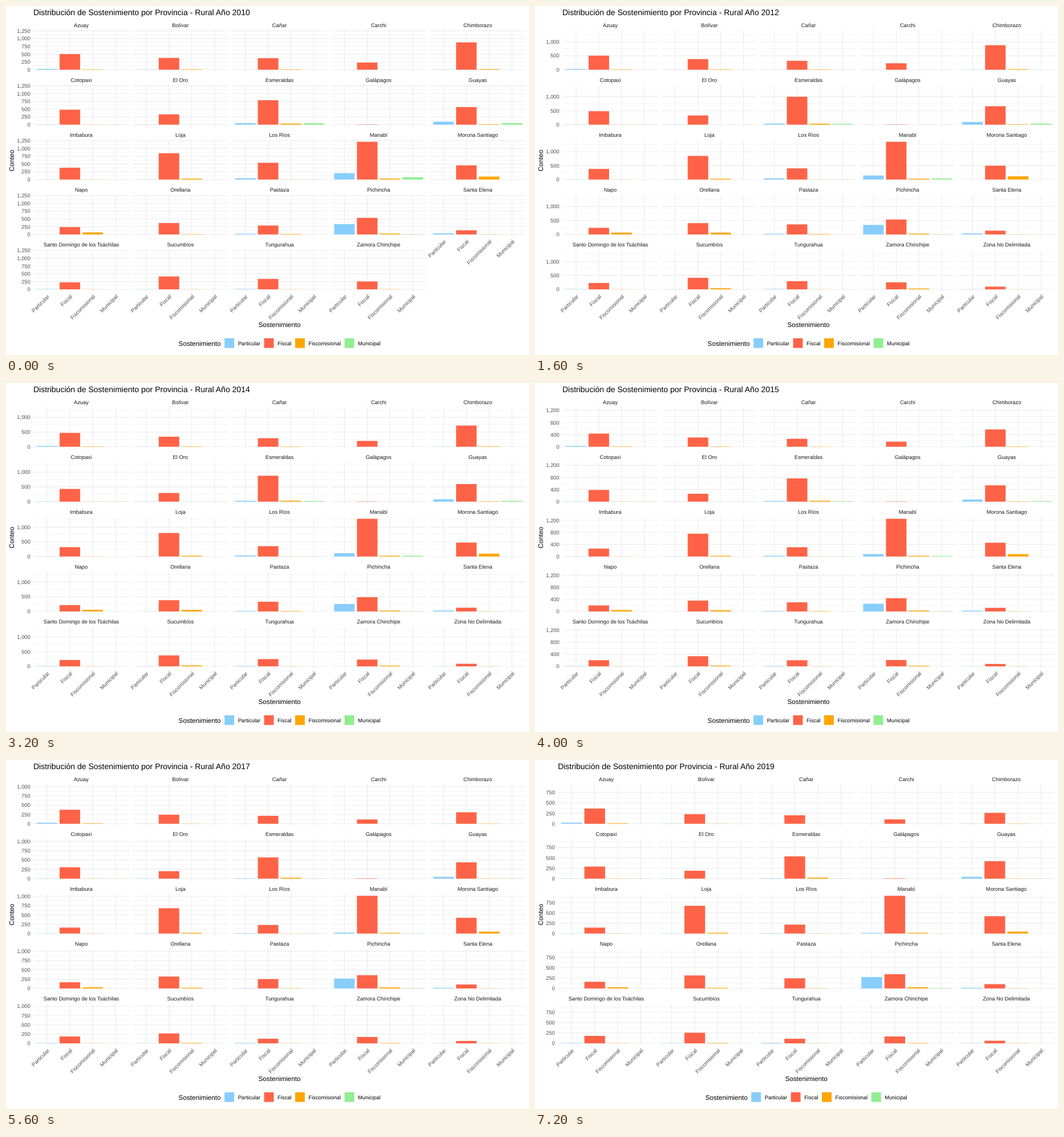
Animation, 917 px wide and 611 px high, one loop 8 s. Source, as an HTML page:

```html
<!DOCTYPE html>
<html lang="es">
<head>
<meta charset="utf-8">
<title>Sostenimiento por Provincia</title>
<style>
  html, body { margin: 0; width: 100%; height: 100%; overflow: hidden; background: #fff; }
  svg { display: block; width: 917px; height: 611px; }
  text { font: 9.34px "Liberation Sans", Arial, sans-serif; text-rendering: geometricPrecision; }
  .title { font-size: 14px; }
  .label { font-size: 11.68px; }
  .tick { fill: #4d4d4d; }
  .strip { fill: #1a1a1a; }
  .major { stroke: #ebebeb; stroke-width: 1.13; }
  .minor { stroke: #ebebeb; stroke-width: .57; }
  .year { visibility: hidden; animation: show 8s step-end infinite; }
  @keyframes show { 0% { visibility: visible; } 10%, 100% { visibility: hidden; } }
</style>
</head>
<body>
<svg id="chart" viewBox="0 0 917 611"></svg>
<script>
const FIRST = 2010, YEARS = 10, HOLD = 0.8;
const KINDS = ['Particular', 'Fiscal', 'Fiscomisional', 'Municipal'];
const COLORS = ['#87cefa', '#ff6347', '#ffa500', '#90ee90'];
const KEY_WIDTHS = [39.4, 24.4, 56.6, 39.4];
const RIGHT = 911.16, GAP = 5.84, ROW = 96.12, ZERO = 111.55, RISE = 66.1, PAD = 3.3;

const lerp = (a, b, t) => a + (b - a) * t;
const ramp = (year, from, to) => Math.min(1, Math.max(0, (year - from) / (to - from)));
const smooth = t => t * t * (3 - 2 * t);

// A level held from 2012 that eases to its end by 2018, with an optional other start in 2010.
const trend = (high, end = high, start = high) => year => year < 2012
  ? lerp(start, high, ramp(year, 2010, 2012))
  : lerp(high, end, smooth(ramp(year, 2012, 2018)));

// Straight segments through [year, value] points.
const through = (...points) => year => points.reduce((value, [to, next], i) =>
  i ? lerp(value, next, ramp(year, points[i - 1][0], to)) : next, 0);

const peak = through([2010, 1215], [2012, 1354], [2015, 1249], [2016, 1122], [2018, 909]);
const none = trend(0), trace = trend(4);

const provinces = [];
const add = (name, fiscal, particular = none, mixed = trace, municipal = none) =>
  provinces.push({ name, series: [particular, fiscal, mixed, municipal] });

add('Azuay', trend(505, 365), trend(26), trend(12));
add('Bolívar', trend(380, 230), trace, trend(14, 4));
add('Cañar', trend(320, 204, 372), none, trend(14, 0));
add('Carchi', trend(230, 105), none, none);
add('Chimborazo', trend(880, 262), trace, trend(20, 5));
add('Cotopaxi', trend(480, 290), trace, trace, trace);
add('El Oro', trend(330, 190), trace, none);
add('Esmeraldas', trend(1000, 536, 785), trend(36, 8, 50), trend(34, 24), trend(28, 4, 45));
add('Galápagos', trend(9), none, none);
add('Guayas', trend(660, 420, 565), trend(94, 43), trend(14, 4), trend(36, 5, 50));
add('Imbabura', trend(380, 142), trace);
add('Loja', trend(846, 667), trace, trend(28, 18));
add('Los Ríos', trend(400, 215, 539), trend(42, 8), trace, trace);
add('Manabí', peak, trend(145, 16, 205), trend(30, 17), trend(38, 3, 75));
add('Morona Santiago', trend(495, 417, 456), none, trend(115, 46, 95));
add('Napo', trend(235, 160), none, trend(65, 28));
add('Orellana', trend(405, 312, 366), none, trend(65, 14, 10));
add('Pastaza', trend(360, 243, 287), trend(22, 4), trend(15, 5));
add('Pichincha', trend(534, 342), through([2010, 330], [2012, 342], [2014, 250], [2019, 275]), trend(28), trend(8));
add('Santa Elena', trend(134, 103), trend(36, 16));
add('Santo Domingo de los Tsáchilas', trend(226, 180), trend(8));
add('Sucumbíos', trend(414, 255), trace, trend(38, 10, 4));
add('Tungurahua', trend(293, 110, 336), trend(12), trace);
add('Zamora Chinchipe', trend(252, 165), none, trend(30, 8, 6));
add('Zona No Delimitada', trend(96, 62), trace);

// Picks the tick step that best balances round numbers, coverage and density.
function tickStep(max) {
  const low = -max * 0.05, high = max * 1.05, span = high - low;
  let best = { score: -Infinity };
  [1, 5, 2, 2.5, 4, 3].forEach((q, i) => {
    const step = q * 100, inside = Math.floor(high / step);
    for (const count of [inside, inside + 1]) {
      const end = count * step;
      const cover = 1 - 0.5 * ((high - end) ** 2 + low ** 2) / (0.1 * span) ** 2;
      const ratio = (Math.max(end, high) - low) / (4 * step);
      const density = 2 - Math.max(ratio, 1 / ratio);
      const score = 0.25 * (1 - i / 5) + 0.2 * cover + 0.5 * density;
      if (score > best.score) best = { score, step };
    }
  });
  return best.step;
}

const px = n => n.toFixed(2);
const line = (x1, y1, x2, y2, cls) =>
  `<line class="${cls}" x1="${px(x1)}" y1="${px(y1)}" x2="${px(x2)}" y2="${px(y2)}"/>`;
const rect = (x, y, w, h, fill) =>
  `<rect x="${px(x)}" y="${px(y)}" width="${px(w)}" height="${px(h)}" fill="${fill}"/>`;
const text = (str, x, y, cls = '', anchor = 'start', angle = 0) =>
  `<text class="${cls}" text-anchor="${anchor}" transform="translate(${px(x)} ${px(y)}) rotate(${angle})">${str}</text>`;

function drawPanel({ name, series }, index, { year, max, step, left, width }, lastRow) {
  const col = index % 5;
  const x = left + col * (width + GAP), zero = ZERO + Math.floor(index / 5) * ROW;
  const top = zero - RISE - PAD, bottom = zero + PAD;
  const scale = RISE / max, half = step / 2, unit = width / 4.2;
  const center = k => x + unit * (k + 0.6);
  let out = text(name, x + width / 2, zero - 74.65, 'strip', 'middle');

  for (let k = 0; k * half <= max * 1.05; k++) {
    const y = zero - k * half * scale, major = k % 2 === 0;
    out += line(x, y, x + width, y, major ? 'major' : 'minor');
    if (major && col === 0)
      out += text((k * half).toLocaleString('en-US'), left - 5.26, y + 3.3, 'tick', 'end');
  }
  KINDS.forEach((kind, k) => {
    out += line(center(k), top, center(k), bottom, 'major');
    if (lastRow) out += text(kind, center(k) + 4.7, bottom + 9.96, 'tick', 'end', -45);
  });
  series.forEach((value, k) => {
    const h = value(year) * scale;
    if (h > 0) out += rect(center(k) - unit * 0.45, zero - h, unit * 0.9, h, COLORS[k]);
  });
  return out;
}

function drawLegend(mid) {
  let x = mid - 176.95;
  let out = text('Sostenimiento', x, 594.6, 'label');
  x += 79.84;
  KINDS.forEach((kind, k) => {
    out += rect(x + 0.7, 581.7, 16.94, 16.94, COLORS[k]) + text(kind, x + 24.18, 593.7);
    x += 24.18 + KEY_WIDTHS[k] + GAP;
  });
  return out;
}

function drawYear(i) {
  const year = FIRST + i, max = peak(year), step = tickStep(max);
  const topTick = Math.floor(max * 1.05 / step) * step;
  const left = topTick < 1000 ? 40.15 : 47.95;
  const width = (RIGHT - left - 4 * GAP) / 5, mid = (left + RIGHT) / 2;
  const shown = provinces.slice(0, year < 2012 ? 24 : 25);
  const axes = { year, max, step, left, width };
  return `<g class="year" style="animation-delay:${((i - YEARS) * HOLD).toFixed(1)}s">`
    + text(`Distribución de Sostenimiento por Provincia - Rural Año ${year}`, left, 16, 'title')
    + shown.map((p, n) => drawPanel(p, n, axes, n + 5 >= shown.length)).join('')
    + text('Sostenimiento', mid, 561.7, 'label', 'middle')
    + text('Conteo', 14.2, 270.7, 'label', 'middle', -90)
    + drawLegend(mid) + '</g>';
}

document.getElementById('chart').innerHTML =
  Array.from({ length: YEARS }, (_, i) => drawYear(i)).join('');
</script>
</body>
</html>
```
